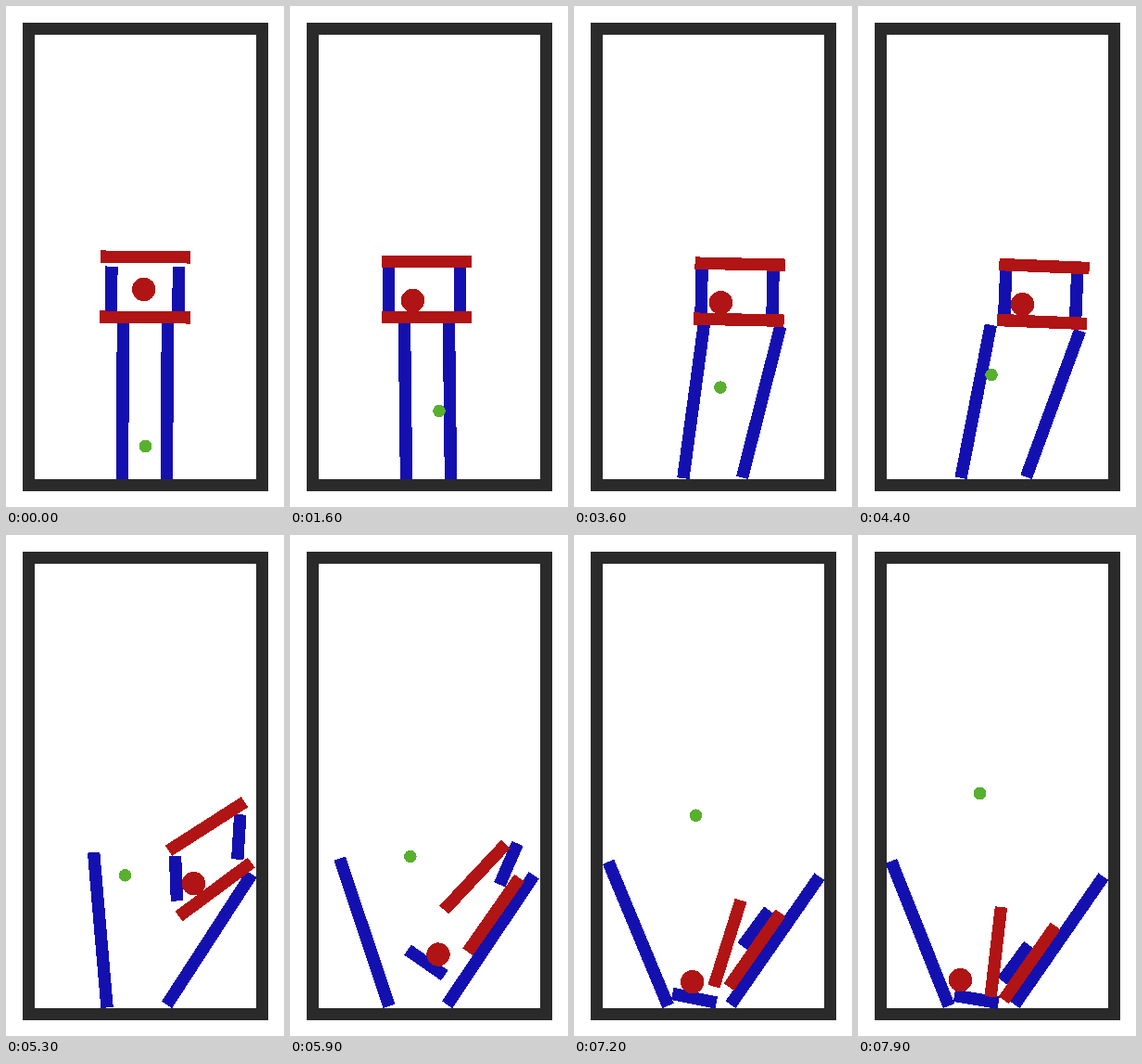
An HTML page that plays this animation: 300 px wide and 540 px high, repeating every 8000 ms.

```html
<!DOCTYPE html>
<html lang="en">
<head>
<meta charset="utf-8">
<title>Collapsing tower</title>
<style>
  html, body { margin: 0; width: 100%; height: 100%; overflow: hidden; background: #fff; }
  svg { display: block; }
</style>
</head>
<body>
<svg id="stage" width="300" height="540" shape-rendering="crispEdges">
  <rect x="24.5" y="24.5" width="252" height="492" fill="none" stroke="#2a2a2a" stroke-width="13"/>
</svg>
<script>
const LOOP = 8000, STEP = 100;
const FLOOR = 510, THICK = 13.4, LEG = 168;
const BLUE = '#1410b0', RED = '#b01414', GREEN = '#58b02e';
const svg = document.getElementById('stage');
const rad = deg => deg * Math.PI / 180;

function add(tag, attrs) {
  const el = document.createElementNS('http://www.w3.org/2000/svg', tag);
  for (const name in attrs) el.setAttribute(name, attrs[name]);
  return svg.appendChild(el);
}
const bar = (w, h, fill) => add('rect', { x: -w / 2, y: -h / 2, width: w, height: h, fill });
const disc = (r, fill) => add('circle', { r, fill });

const parts = {
  legL: bar(THICK, LEG, BLUE),
  legR: bar(THICK, LEG, BLUE),
  postL: bar(THICK, 48.4, BLUE),
  postR: bar(THICK, 48.4, BLUE),
  deck: bar(97.4, THICK, RED),
  roof: bar(97.4, THICK, RED),
  ball: disc(12.7, RED),
  dot: disc(6.8, GREEN)
};

// A point given in the axes of a turned part.
function offset([x, y, a], dx, dy) {
  const c = Math.cos(rad(a)), s = Math.sin(rad(a));
  return [x + dx * c - dy * s, y + dx * s + dy * c, a];
}

// A leg standing on the floor on its lower corner.
function leg(foot, a) {
  const base = FLOOR - THICK / 2 * Math.abs(Math.sin(rad(a)));
  return offset([foot, base, a], 0, -LEG / 2);
}

// Pose moved by [dx, dy, turn] in proportion to each stage's progress.
const shift = (pose, ...moves) =>
  pose.map((v, i) => moves.reduce((sum, [p, d]) => sum + p * d[i], v));

function poses(t) {
  const ramp = (from, to, power = 1) =>
    Math.min(1, Math.max(0, (t - from) / (to - from))) ** power;

  // Sway left, lean right, topple, crash, then settle.
  const sway = ramp(0, 1.6), lean = ramp(1.6, 4.4), slide = ramp(2.7, 4.4);
  const topple = ramp(4.4, 5.3, 1.3), crash = ramp(5.3, 6.6), settle = ramp(6.6, 7.9);
  const tumble = ramp(5.3, 6.1, 1.2), spin = ramp(4.4, 5.85);

  const legL = leg(125.5 - 14.5 * slide - 13 * ramp(4.4, 7.9, 1.4),
    .3 - sway + 11.8 * lean - 34.4 * ramp(4.4, 6.1, 1.2) + 1.6 * settle);
  const legR = leg(173.5 + 8 * ramp(1.6, 2.7) - 12.5 * ramp(4.4, 6, .8),
    .3 - sway + 20.9 * lean + 12.8 * topple + 1.8 * crash);

  // The cabin stays whole until it topples.
  const cabin = [150 - 2.5 * sway + 21.5 * lean + 29.5 * lean ** 2,
    335.5 + 5 * slide, .4 * (1 - sway) + 2.4 * slide];
  const postL = offset(cabin, -36.5 - 4.5 * sway, -30.5);
  const postR = offset(cabin, 36, -30.5);
  const roof = offset(cabin, 0, -65 + 5 * ramp(0, .3, 2));
  const ball = offset(cabin, -1.5 - 13.5 * sway - 6.8 * lean, -30 + 12 * ramp(0, .5, 2));

  // Deck and right post slide down the right leg.
  const broken = t > 4.4;
  const deckTurn = 2.4 - 57.4 * spin * spin * (3 - 2 * spin);
  const deckOnLeg = offset(legR, -41.7 + 29.4 * ramp(4.4, 5.9),
    -79 + 85 * ramp(4.4, 6.6, 1.15) + 32 * settle);
  const postOnLeg = offset(legR, -16.6 - 16.8 * topple + 8.7 * crash,
    -118.5 + 8.5 * topple + 156.5 * ramp(5.3, 7.9, 1.1));
  const postTurn = 2.4 + 1.1 * topple + 33 * ramp(5.3, 6.3);

  return {
    legL, legR,
    postL: shift(postL, [topple, [24.7, 62, -4.7]], [tumble, [-51.7, 128, -74.7]], [settle, [-4, 2, -3.5]]),
    postR: broken ? [postOnLeg[0], postOnLeg[1], postTurn] : postR,
    deck: broken ? [deckOnLeg[0], deckOnLeg[1], deckTurn] : cabin,
    roof: shift(roof, [topple, [15.5, 33.5, -35]], [crash, [-36.7, 118.3, -30.7]], [settle, [-31, 17, -20]]),
    ball: shift(ball, [topple, [25, 54, 0]], [tumble, [-60, 108, 0]], [settle, [-32, -4, 0]]),
    dot: [150.5 + 23 * ramp(0, 2.7, 1.5) - 45 * ramp(2.7, 5.3) + 3 * crash,
      474.5 - 38 * sway - 10 * ramp(1.6, 2.7) - 29 * slide - 119 * ramp(4.4, 7.9), 0]
  };
}

function draw(now) {
  const now10 = Math.floor(now % LOOP / STEP) * STEP / 1000;
  for (const [name, [x, y, a]] of Object.entries(poses(now10)))
    parts[name].setAttribute('transform', `translate(${x} ${y}) rotate(${a})`);
}

let start;
function frame(now) {
  start ??= now;
  draw(now - start);
  requestAnimationFrame(frame);
}
draw(0);
requestAnimationFrame(frame);
</script>
</body>
</html>
```
